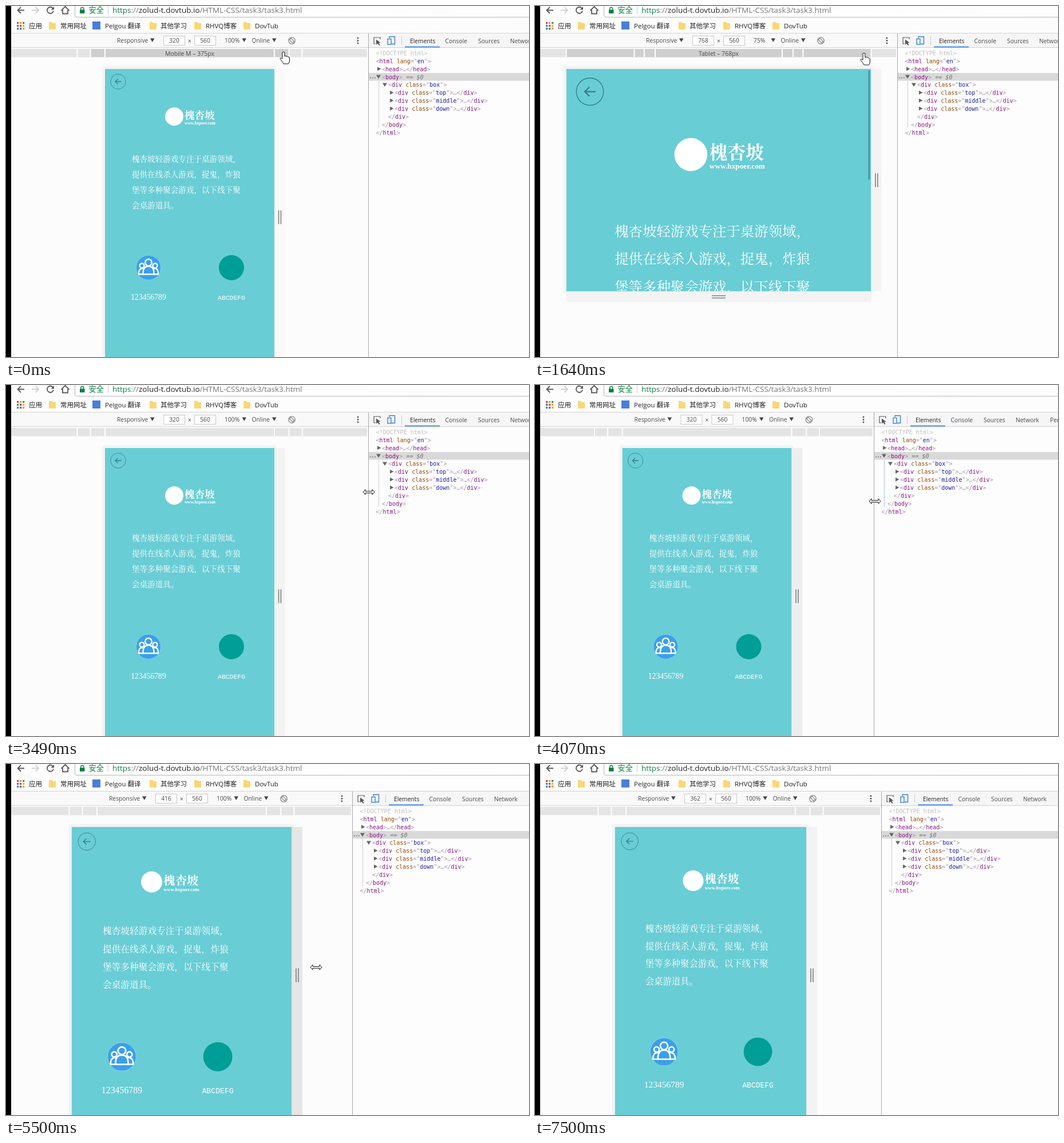
Animation of 914x613 px, one loop 7960 ms. Source, as an HTML page:

```html
<!DOCTYPE html>
<html lang="zh">
<head>
<meta charset="utf-8">
<title>Responsive page preview</title>
<style>
html, body { margin: 0; width: 914px; height: 613px; overflow: hidden; background: #fdfdfd; }
svg { display: block; }
text { white-space: pre; }
.ui { font: 10.3px "Open Sans", "Noto Sans", sans-serif; fill: #4a4a4a; }
.mark { font: 11.5px "Open Sans", "Noto Sans CJK SC", "Noto Sans CJK", sans-serif; fill: #222; }
.code { font: 10px "DejaVu Sans Mono", "Noto Sans Mono", monospace; }
.song { font: 300 13.57px "Noto Serif CJK SC", "Noto Sans CJK SC", "Noto Sans CJK", serif; fill: #fff; }
.mid { text-anchor: middle; }
.line { fill: none; stroke: #5a5a5a; stroke-width: 1.8; }
</style>
</head>
<body>
<svg id="stage" width="914" height="613" viewBox="0 0 914 613">
  <rect width="914" height="613" fill="#fcfcfc"/>

  <g id="device">
    <rect id="glow" fill="#f3f3f3" rx="5"/>
    <rect id="strip"/>
    <rect id="foot"/>
    <path id="grip" stroke="#808080" stroke-width="1.6"/>
    <svg id="page" y="110">
      <rect width="100%" height="100%" fill="#69cdd5"/>
      <g id="content">
        <g fill="none" stroke="#31818a">
          <circle cx="23" cy="22" r="13.2" stroke-width=".8"/>
          <path d="M28.5 22H18M22.5 17.5L18 22L22.5 26.5" stroke-width="1.3"/>
        </g>
        <circle cx="121" cy="83" r="16" fill="#fff"/>
        <text class="song" x="139" y="87" style="font-size:17.6px;font-weight:800">槐杏坡</text>
        <text x="139" y="96.5" fill="#fff" style="font:bold 7.4px 'Liberation Serif',serif">www.hxpoer.com</text>
        <g id="copy"></g>
        <circle cx="76" cy="347" r="21.5" fill="#3aa0ea" stroke="#86cbee" stroke-width=".9"/>
        <g fill="#3aa0ea" stroke="#fff" stroke-width="2.3" stroke-linejoin="round">
          <circle cx="64.5" cy="343.5" r="4"/>
          <circle cx="87.5" cy="343.5" r="4"/>
          <path d="M59 358.5Q58.5 349 65 348.5H87Q93.5 349 93 358.5Z"/>
          <path d="M66.5 358.5Q66 344.5 76 344.5T85.5 358.5Z"/>
          <circle cx="76" cy="338" r="5.8"/>
        </g>
        <circle cx="221" cy="347" r="22" fill="#009e96"/>
        <text class="mid" x="76" y="402.5" fill="#fff" style="font:13.7px 'Liberation Serif',serif">123456789</text>
        <text class="mid" x="221" y="402.5" fill="#fff" style="font:11.4px 'Liberation Mono',monospace">ABCDEFG</text>
      </g>
      <rect id="thumb" y="2" width="3" rx="1.5" fill="#000" opacity=".27"/>
    </svg>
  </g>

  <rect x="9" y="48" width="905" height="25" fill="#f9f9f9"/>
  <path d="M9 72.5H914" stroke="#d4d4d4"/>
  <rect x="9" y="73" width="905" height="18" fill="#fcfcfc"/>
  <svg id="ruler" x="9" y="75" height="14.5"></svg>
  <text id="preset" class="ui mid" y="86.8" style="font-size:10.5px"></text>
  <g id="bar" class="ui">
    <text x="-127" y="64.3">Responsive</text>
    <g fill="#fff" stroke="#c8c8c8">
      <rect x="-45.5" y="52.5" width="37" height="16"/>
      <rect x="8.5" y="52.5" width="37" height="16"/>
    </g>
    <text id="size" class="mid" x="-27" y="64.3"></text>
    <text class="mid" x="0" y="65">×</text>
    <text class="mid" x="27" y="64.3">560</text>
    <text id="zoom" x="61" y="64.3"></text>
    <text x="108.5" y="64.3">Online</text>
    <path d="M-69 56.5h7.5l-3.75 6.5zM91.5 56.5h7.5l-3.75 6.5zM144 56.5h7.5l-3.75 6.5z" fill="#444"/>
    <g fill="none" stroke="#777" stroke-width="1.1">
      <circle cx="178.5" cy="60.5" r="5.8"/>
      <rect x="-2" y="-4" width="4" height="8" transform="translate(178.5 60.5) rotate(-45)"/>
    </g>
  </g>

  <g id="panel">
    <g fill="#555"><circle cx="-18" cy="56" r="1.4"/><circle cx="-18" cy="60.5" r="1.4"/><circle cx="-18" cy="65" r="1.4"/></g>
    <rect y="48" width="400" height="565" fill="#fdfdfd"/>
    <rect y="48" width="400" height="24" fill="#f6f6f6"/>
    <path d="M0 72.5H400" stroke="#d0d0d0"/>
    <path d="M.5 48V613" stroke="#a9a9a9"/>
    <path d="M13 66H10V55H21V58" fill="none" stroke="#5a5a5a" stroke-width="1.2"/>
    <path d="M14 58.5V67.5L16.5 65.5L19 69L20.5 68L18.3 64.5L21.5 64Z" fill="#555"/>
    <g fill="none" stroke="#3980d6" stroke-width="1.4">
      <path d="M37 56V53.5H46.5V66.5H41"/><rect x="34" y="57.5" width="6" height="9.5"/>
    </g>
    <path d="M58.5 53V68" stroke="#ccc"/>
    <rect x="64" y="70.5" width="61" height="2" fill="#4a90e8"/>
    <g class="ui">
      <text x="73" y="64.5" style="fill:#222">Elements</text>
      <text x="134.5" y="64.5">Console</text>
      <text x="192" y="64.5">Sources</text>
      <text x="248" y="64.5">Network</text>
      <text x="308" y="64.5">Performance</text>
    </g>
    <rect x="1" y="117" width="400" height="13.5" fill="#d9d9d9"/>
    <path id="guide" d="M18.5 131V213"/>
    <g id="tree" class="code"></g>
  </g>

  <rect width="914" height="47" fill="#fdfdfd"/>
  <path d="M9 47.5H914" stroke="#d2d2d2"/>
  <path d="M32 7.5H20.5M26 2L20.5 7.5L26 13" class="line"/>
  <path d="M45 7.5H57M51.5 2L57 7.5L51.5 13" class="line" style="stroke:#d0d0d0"/>
  <path d="M82 4A5.6 5.6 0 1 0 83 8.5" class="line"/><path d="M84 1V6.5H78.5Z" fill="#5a5a5a"/>
  <path d="M96.5 8L103.5 1L110.5 8M99 7V13.5H108V7" class="line"/>
  <path d="M120.5 -2V16Q120.5 19.5 124 19.5H914" fill="#fff" stroke="#b5b5b5"/>
  <rect x="129" y="6.5" width="8.5" height="6.5" rx=".8" fill="#0b8043"/>
  <path d="M130.7 7V5A2.5 2.5 0 0 1 135.7 5V7" fill="none" stroke="#0b8043" stroke-width="1.4"/>
  <text x="144.5" y="12.3" class="mark" style="font-size:13.2px;fill:#0b8043">安全</text>
  <path d="M178.5 1V14" stroke="#c9c9c9"/>
  <text x="186" y="12.3" style="font:13.5px 'Open Sans','Noto Sans',sans-serif" fill="#777"><tspan fill="#0b8043">https</tspan>://<tspan fill="#222">zolud-t.dovtub.io</tspan>/HTML-CSS/task3/task3.html</text>
  <g id="marks" class="mark"></g>
  <rect width="9" height="613" fill="#000"/>

  <path id="cursor" fill="#fff" stroke="#111" stroke-linejoin="round"/>
</svg>
<script>
const LOOP = 7960, RATIO = 0.925, TOP = 110;
const $ = id => document.getElementById(id);

function add(parent, tag, attrs, text) {
  const node = document.createElementNS("http://www.w3.org/2000/svg", tag);
  set(node, attrs);
  if (text) node.textContent = text;
  return parent.appendChild(node);
}
function set(node, attrs) {
  for (const key in attrs) node.setAttribute(key, attrs[key]);
}

// Bookmarks bar
["#e4453a", "#f0a030", "#3f9c4f", "#3b78d8", "#e4453a", "#f0b030", "#3f9c4f", "#3b78d8", "#f0a030"].forEach((fill, i) =>
  add($("marks"), "rect", { x: 19 + i % 3 * 5, y: 28 + (i / 3 | 0) * 5, width: 3.3, height: 3.3, fill }));
[[40, "应用"], [95, "常用网址", 75], [173, "Pelgou 翻译"], [270, "其他学习", 251], [349, "RHVQ博客", 329], [435, "DovTub", 415]]
  .forEach(([x, label, folder]) => {
    add($("marks"), "text", { x, y: 38.5 }, label);
    if (folder) add($("marks"), "path", { d: `M${folder} 28h5l2 2h5v11h-12z`, fill: "#f8d775" });
  });
add($("marks"), "rect", { x: 151, y: 27, width: 14, height: 14, fill: "#4a7fd8" });

// Page copy
["槐杏坡轻游戏专注于桌游领域，", "提供在线杀人游戏，捉鬼，炸狼", "堡等多种聚会游戏，以下线下聚", "会桌游道具。"].forEach((line, i) =>
  add($("copy"), "text", { class: "song", x: 47, y: 162 + i * 27 }, line));

// Element tree: x offset, arrow, markup
const rows = [
  [13.5, "", "<!DOCTYPE html>"], [13.5, "", '<html lang="en">'], [24, "▶", "<head>…</head>"],
  [24, "▼", "<body>"], [35, "▼", '<div class="box">'], [46, "▶", '<div class="top">…</div>'],
  [46, "▶", '<div class="middle">…</div>'], [46, "▶", '<div class="down">…</div>'],
  [35, "", "</div>"], [24, "", "</body>"], [13.5, "", "</html>"]
];
rows.forEach(([x, arrow, code], i) => {
  const y = 86 + i * 13.85, text = add($("tree"), "text", { x, y });
  if (arrow) add($("tree"), "path", {
    d: arrow === "▶" ? `M${x - 8} ${y - 7.5}v7l6.5 -3.5z` : `M${x - 10} ${y - 7}h8l-4 6.5z`, fill: "#666"
  });
  let prev = "";
  for (const part of code.match(/<\/?|\w+|[^<]/g)) {
    const word = /\w/.test(part);
    const fill = i === 0 ? "#c0c0c0" : !word ? "#a894a6" : prev === '"' ? "#1a1aa6" : prev[0] === "<" ? "#881280" : "#994500";
    add(text, "tspan", { fill }, part);
    prev = part;
  }
  if (code === "<body>") {
    add($("tree"), "text", { x: 66.5, y, fill: "#777", "font-style": "italic" }, "== $0");
    add($("tree"), "path", { d: `M3 ${y - 2}h2m2 0h2m2 0h2`, stroke: "#777", "stroke-width": 1.6 });
  }
});

// Ruler presets, widest first
const presets = [1024, 768, 425, 375, 320].map(px => ({
  px, gap: add($("ruler"), "rect", { height: 14.5, fill: "#fff" }), fill: add($("ruler"), "rect", { height: 14.5 })
}));
const names = { 320: "Mobile S", 375: "Mobile M", 425: "Mobile L", 768: "Tablet" };

const cursors = {
  hand: "M-2 1Q0 -1 2 1V8Q4 6.5 5 8Q7 7 8 9Q10.5 8.5 10.5 11V15Q10.5 18 8.5 21H0Q-1 18 -4 15Q-7 12 -5.5 11Q-4 10 -2 12Z",
  arrow: "M0 0V16L4 12.5L6.5 18.5L9 17.5L6.5 11.5H11.5Z",
  resize: "M-10 0L-6 -4.5V-1.5H6V-4.5L10 0L6 4.5V1.5H-6V4.5Z",
  none: ""
};

// The screen refreshes in bursts: from, to, count
const ticks = [0];
for (const [from, to, count] of [[150, 570, 4], [970, 1940, 8], [2070, 2070, 1], [2370, 3360, 8], [3490, 3490, 1],
  [3770, 4070, 3], [4320, 4710, 4], [4830, 5500, 6], [5650, 5800, 2], [5920, 6050, 2], [6200, 6870, 6], [7020, 7500, 5]])
  for (let i = 0; i < count; i++) ticks.push(Math.round(from + (count > 1 ? (to - from) * i / (count - 1) : 0)));

const clicks = [[0, 320], [150, 375], [970, 425], [1386, 768], [2370, 320]];
const drag = [[4830, 320], [5500, 416], [5800, 470], [5920, 440], [6050, 388], [6468, 362]];
const reflow = [[4964, 320], [5500, 370], [5800, 440], [5920, 430], ...drag.slice(4)];
const divider = [[3490, 633], [3770, 620], [3920, 602], [4070, 592], [4320, 597], [4450, 605]];
const hovers = [[0, 375], [570, 425], [1247, 768], [1663, 0], [2370, 320], [2511, 0]];
const shades = [[0, "#f9f9f9"], [150, "#f3f3f3"], [4070, "#eee"], [4450, "#f3f3f3"], [4830, "#e6e6e6"], [5650, "#dadada"], [6870, "#e6e6e6"], [7020, "#f3f3f3"]];
const thumbs = [[0, 0], [150, 1], [570, 0], [970, 1], [1800, 0], [5650, 1], [6468, 0]];
const kinds = [[0, "hand"], [1663, "arrow"], [2370, "hand"], [2511, "arrow"], [3360, "resize"], [4580, "arrow"], [4830, "resize"], [7020, "arrow"], [7500, "none"]];
const path = [[0, 485, 80], [150, 485, 80], [570, 498, 82], [970, 509, 83], [1247, 560, 81], [1525, 575, 82], [1940, 573, 433],
  [2070, 281, 78], [2370, 409, 83], [2511, 430, 125], [3360, 634, 187], [3490, 634, 187], [3770, 621, 195], [4070, 594, 203],
  [4450, 606, 215], [4830, 464, 350], [5500, 542, 355], [5800, 534, 357], [6050, 502, 357], [6468, 484, 359], [6870, 483, 360],
  [7020, 490, 372], [7380, 835, 590]];

const hold = (track, t) => track.filter(key => key[0] <= t).pop()[1];
function lerp(track, t, n = 1) {
  const i = track.findIndex(key => key[0] > t);
  if (i < 1) return (i ? track[track.length - 1] : track[0])[n];
  const a = track[i - 1], b = track[i];
  return a[n] + (b[n] - a[n]) * (t - a[0]) / (b[0] - a[0]);
}

function draw(t) {
  const edge = lerp(divider, t), mid = (9 + edge) / 2;
  const dragging = t >= 4830;
  const css = Math.round(dragging ? lerp(drag, t) : hold(clicks, t));
  const flow = dragging ? lerp(reflow, t) : css;
  const zoom = css === 768 ? 0.75 : 1, k = RATIO * zoom;
  const w = css * k, h = 560 * k, left = mid - w / 2, right = left + w, bottom = TOP + h;

  set($("glow"), { x: left - 5, y: TOP - 5, width: w + 9, height: h + 10 });
  set($("strip"), { x: right, y: TOP, width: 18.5, height: h, fill: hold(shades, t) });
  set($("foot"), { x: left, y: bottom, width: w, height: 18.5, fill: "#f3f3f3" });
  const gy = TOP + h / 2;
  set($("grip"), { d: `M${right + 7.5} ${gy - 12}v24m4 0v-24M${mid - 12} ${bottom + 7.5}h24m0 4h-24` });
  set($("page"), { x: left, width: w, height: h });
  set($("content"), { transform: `scale(${flow * k / 296})` });
  set($("thumb"), { x: w - 5, height: h * h / (1.481 * w), visibility: hold(thumbs, t) ? "visible" : "hidden" });

  const hover = hold(hovers, t);
  set($("ruler"), { width: edge - 11 });
  for (const p of presets) {
    const pw = p.px * k, x = mid - 9 - pw / 2;
    set(p.gap, { x: x - 1, width: pw + 2 });
    set(p.fill, { x: x + 1, width: pw - 2, fill: p.px <= hover ? "#cfcfcf" : "#e4e4e4" });
  }
  $("preset").textContent = hover ? `${names[hover]} – ${hover}px` : "";
  set($("preset"), { x: mid });
  set($("bar"), { transform: `translate(${mid} 0)` });
  $("size").textContent = css;
  $("zoom").textContent = zoom * 100 + "%";
  set($("panel"), { transform: `translate(${edge} 0)` });
  set($("guide"), { stroke: t >= 3770 && t < 4450 ? "#9cc8f2" : "#cfcfcf" });
  set($("cursor"), { d: cursors[hold(kinds, t)], transform: `translate(${lerp(path, t)} ${lerp(path, t, 2)})` });
}

let shown = -1;
function frame() {
  const now = performance.now() % LOOP;
  const tick = ticks.filter(time => time <= now).pop();
  if (tick !== shown) draw(shown = tick);
  requestAnimationFrame(frame);
}
frame();
</script>
</body>
</html>
```
